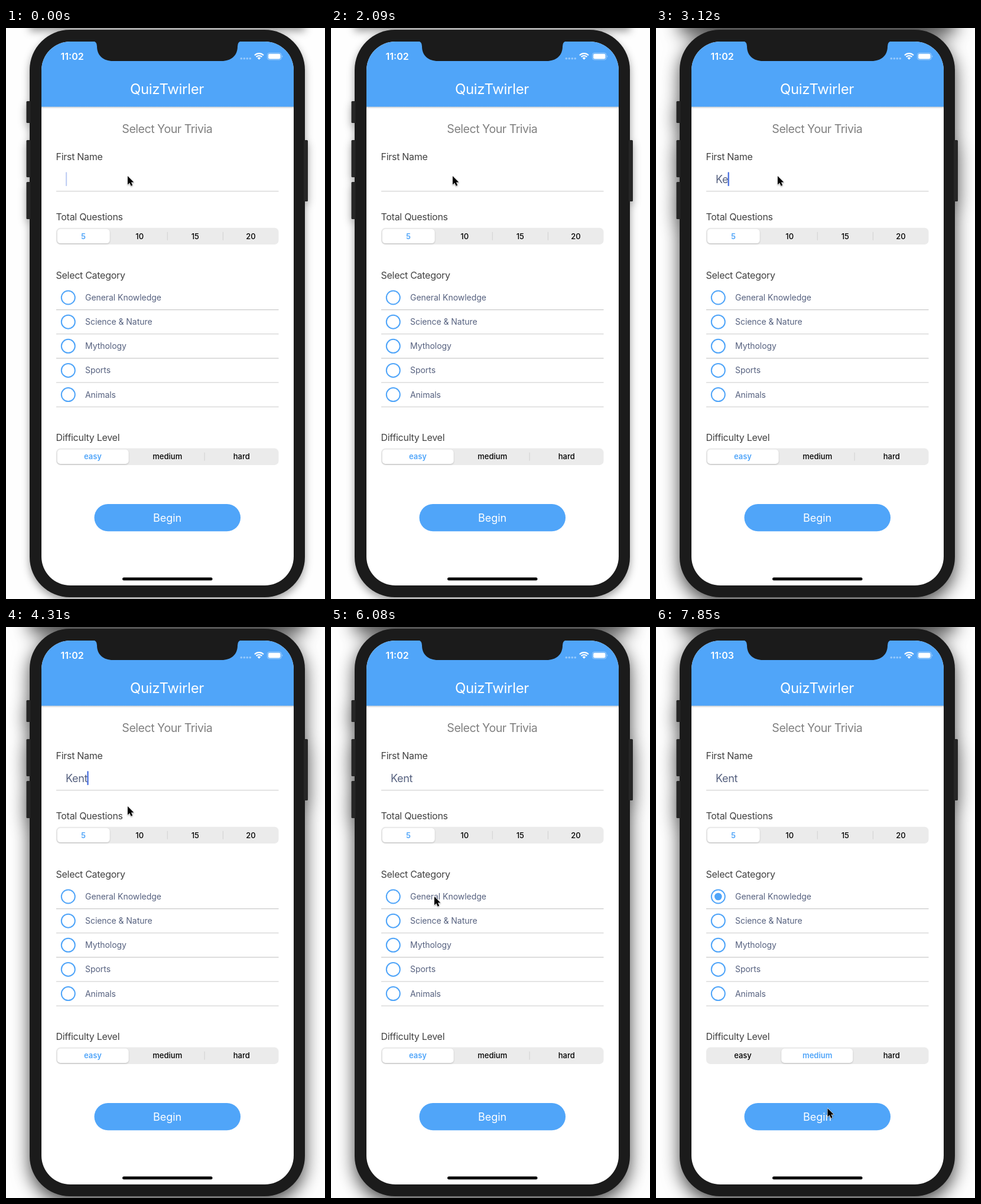
These frames come from a looping animation (540x968 px, 8 s). An HTML page:

```html
<!DOCTYPE html>
<html lang="en">
<head>
<meta charset="utf-8">
<title>Trivia setup</title>
<style>
  html, body { margin: 0; width: 100%; height: 100%; overflow: hidden; background: #fefefe; }
  svg { display: block; width: 100%; height: 100%; font-family: Inter, Roboto, sans-serif; }
  .idle { filter: drop-shadow(0 6px 7px rgba(0, 0, 0, .38)); }
  .active { filter: drop-shadow(0 11px 15px rgba(0, 0, 0, .72)); }
  .mid { text-anchor: middle; }
  .label { font-size: 16px; letter-spacing: -.28px; fill: #424242; }
  .item { font-size: 14px; letter-spacing: -.05px; fill: #56617f; }
  .seg { font-size: 13px; font-weight: 500; text-anchor: middle; fill: #000; }
  .seg.on { font-weight: 600; fill: #50a5f9; }
  .pill { fill: #fff; filter: drop-shadow(0 1px 1px rgba(0, 0, 0, .2)); }
  .rule { stroke: #c9c9c9; stroke-width: 1.1; }
</style>
</head>
<body>
<svg id="stage" viewBox="0 0 540 968" xmlns="http://www.w3.org/2000/svg">
  <defs>
    <clipPath id="screen"><rect x="60" y="23" width="427" height="922" rx="49"/></clipPath>
    <linearGradient id="fade" x2="0" y2="1">
      <stop stop-color="#000" stop-opacity=".2"/>
      <stop offset="1" stop-color="#000" stop-opacity="0"/>
    </linearGradient>
  </defs>
  <rect width="540" height="968" fill="#fefefe"/>

  <g id="body" fill="#1b1b1b">
    <rect x="40" y="-40" width="466" height="39.5"/>
    <rect x="40" y="3" width="466" height="962" rx="68"/>
    <g fill="#262626">
      <rect x="34.5" y="124" width="7" height="37" rx="1.5"/>
      <rect x="34.5" y="190" width="7" height="63" rx="1.5"/>
      <rect x="34.5" y="261" width="7" height="63" rx="1.5"/>
      <rect x="504" y="190" width="7" height="104" rx="1.5"/>
    </g>
  </g>

  <g clip-path="url(#screen)">
    <rect x="60" y="23" width="427" height="922" fill="#fff"/>
    <rect x="60" y="133" width="427" height="4" fill="url(#fade)"/>
    <rect x="60" y="23" width="427" height="110.5" fill="#50a5f9"/>
  </g>
  <path d="M147 22Q154 23 154 31C154 47 165 56 181 56H365C381 56 392 47 392 31Q392 23 399 22Z" fill="#1b1b1b"/>

  <g fill="#fff">
    <text id="clock" x="92.5" y="53.8" font-size="16" font-weight="600"></text>
    <g opacity=".4">
      <circle cx="398.3" cy="51.8" r="1.8"/><circle cx="403.3" cy="51.8" r="1.8"/>
      <circle cx="408.3" cy="51.8" r="1.8"/><circle cx="413.3" cy="51.8" r="1.8"/>
    </g>
    <g fill="none" stroke="#fff" stroke-width="2.1">
      <path d="M420.9 46.2a10.6 10.6 0 0 1 15 0M423.5 49a7 7 0 0 1 9.8 0"/>
    </g>
    <path d="M428.4 53.8l-2.8-2.9a4 4 0 0 1 5.6 0z"/>
    <rect x="442.5" y="42.3" width="23.5" height="11.6" rx="3.4" fill="none" stroke="#fff" stroke-opacity=".45"/>
    <rect x="444" y="43.8" width="20.5" height="8.6" rx="2.1"/>
    <path d="M467.3 46.2q2 1.9 0 3.8z" opacity=".5"/>
    <text class="mid" x="272.5" y="111.5" font-size="24" letter-spacing="-.3">QuizTwirler</text>
  </g>

  <text class="mid" x="272.8" y="178.2" font-size="19.6" letter-spacing="-.5" fill="#808080">Select Your Trivia</text>
  <text class="label" x="84.5" y="223.8">First Name</text>
  <text class="label" x="84.5" y="326.3">Total Questions</text>
  <text class="label" x="84.5" y="424.6">Select Category</text>
  <text class="label" x="84.5" y="700">Difficulty Level</text>
  <path class="rule" d="M85 276.7H461.5"/>
  <text id="name" x="101" y="263" font-size="18" letter-spacing="-.35" fill="#56617f"></text>
  <rect id="caret" y="244.2" width="2.2" height="23.8" rx=".8" fill="#4169df"/>

  <g id="count"></g>
  <g id="list"></g>
  <g id="level"></g>

  <rect x="149.5" y="807" width="247.5" height="46.3" rx="23.1" fill="#50a5f9"/>
  <text class="mid" x="273" y="837" font-size="18" letter-spacing="-.05" fill="#fff">Begin</text>
  <rect x="197" y="931.5" width="152.5" height="5" rx="2.5"/>

  <path id="pointer" d="M0 0V14.6L3.3 11.5L5.7 16.7L8.2 15.6L5.9 10.6H10.4Z" stroke="#fff" stroke-width="1.1"
        stroke-linejoin="round" paint-order="stroke" style="filter:drop-shadow(0 1px 1px rgba(0,0,0,.35))"/>
</svg>
<script>
const LOOP = 8000, TICKS = 54;
const $ = id => document.getElementById(id);

function add(parent, tag, attrs, text = "") {
  const el = document.createElementNS("http://www.w3.org/2000/svg", tag);
  for (const key in attrs) el.setAttribute(key, attrs[key]);
  el.textContent = text;
  return parent.appendChild(el);
}

// Segmented control: track, dividers, sliding pill, labels
function segmented(id, y, names, pillWidth) {
  const g = $(id), step = 376.5 / names.length;
  add(g, "rect", { x: 85, y, width: 376.5, height: 28.3, rx: 7, fill: "#ebebeb" });
  const marks = names.slice(1).map((_, i) =>
    add(g, "path", { d: `M${85 + step * (i + 1)} ${y + 7}v14`, stroke: "#d0d0d0" }));
  const pill = add(g, "rect", { class: "pill", y: y + 2, width: pillWidth, height: 24.3, rx: 5.5 });
  const labels = names.map((name, i) => {
    const x = i ? 85 + step * (i + .5) : 87 + pillWidth / 2 - .5;
    return add(g, "text", { class: "seg", x, y: y + 18.8 }, name);
  });
  return (chosen, at) => {
    pill.setAttribute("x", 86.7 + step * at);
    labels.forEach((el, i) => el.classList.toggle("on", i === chosen));
    marks.forEach((el, i) => el.setAttribute("opacity", i === chosen || i + 1 === chosen ? 0 : 1));
  };
}

const setCount = segmented("count", 338.8, ["5", "10", "15", "20"], 89);
const setLevel = segmented("level", 712.6, ["easy", "medium", "hard"], 121);

["General Knowledge", "Science & Nature", "Mythology", "Sports", "Animals"].forEach((name, i) => {
  const y = 457 + 41.15 * i;
  add($("list"), "circle", { cx: 105.3, cy: y, r: 11.5, fill: "none", stroke: "#50a5f9", "stroke-width": 2 });
  add($("list"), "text", { class: "item", x: 134, y: y + 5 }, name);
  add($("list"), "path", { class: "rule", d: `M85 ${y + 20.6}H461.5` });
});
const dot = add($("list"), "circle", { cx: 105.3, cy: 457, r: 6.3, fill: "#50a5f9" });

// Each row: tick, then values
const route = [
  [0, 206, 251], [27, 206, 251], [29, 206, 304], [31, 221, 358], [32, 219, 390], [33, 208, 414],
  [34, 198, 428], [35, 189, 453], [40, 189, 453], [41, 175, 457], [42, 175, 457], [43, 177, 490],
  [44, 184, 560], [45, 198, 640], [46, 213.5, 700], [47, 238, 718], [48, 250, 726], [50, 250, 726],
  [51, 262, 750], [52, 281, 796], [53, 290.5, 816]
];
const blink = [[0, .33], [1, .55], [2, .8], [3, 1], [7, 0], [9, .5], [10, 1], [13, .4], [14, 0], [16, 1], [37, 0]];
const typing = [[0, ""], [18, "K"], [20, "Ke"], [25, "Ken"], [27, "Kent"]];
const slide = [[0, 0], [49, .4], [50, .9], [51, 1]];

const held = (rows, n) => rows.filter(row => row[0] <= n).pop()[1];

function along(rows, n) {
  const i = Math.max(1, rows.findIndex(row => row[0] >= n));
  const [a, b] = [rows[i - 1], rows[i]];
  const k = (n - a[0]) / (b[0] - a[0]);
  return [a[1] + (b[1] - a[1]) * k, a[2] + (b[2] - a[2]) * k];
}

function draw(t) {
  const n = Math.min(TICKS - 1, Math.floor((t + 9) / LOOP * TICKS));
  $("body").setAttribute("class", n < 16 ? "idle" : "active");
  $("clock").textContent = n < 51 ? "11:02" : "11:03";
  const text = held(typing, n);
  $("name").textContent = text;
  $("caret").setAttribute("x", 101 + (text ? $("name").getComputedTextLength() - .6 : 0));
  $("caret").setAttribute("opacity", held(blink, n));
  setCount(0, 0);
  setLevel(n < 49 ? 0 : 1, held(slide, n));
  dot.setAttribute("opacity", n < 42 ? 0 : 1);
  $("pointer").setAttribute("transform", `translate(${along(route, n)})`);
}

const start = performance.now();
function frame() {
  draw((performance.now() - start) % LOOP);
  requestAnimationFrame(frame);
}
frame();
</script>
</body>
</html>
```
